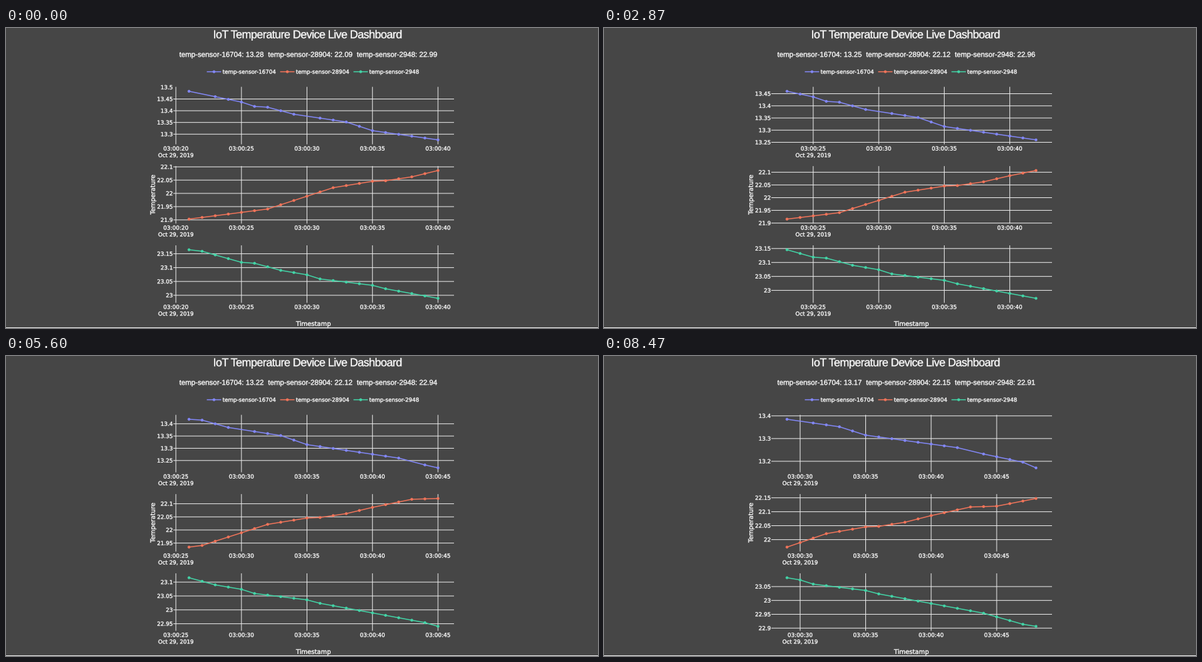
Write a matplotlib script that moves like this. It is 888x450 px and loops after 8.54 s.

```python
import math

import matplotlib.pyplot as plt
import numpy as np
from matplotlib.animation import ArtistAnimation
from matplotlib.collections import LineCollection
from matplotlib.patches import PathPatch, Rectangle
from matplotlib.path import Path
from matplotlib.textpath import TextPath

W, H, DPI = 888, 450, 100
PX = 72 / DPI
STEP, FRAMES = 70, 122
UPDATE_MS, HEAD_START = 1038, 198  # charts refresh on a steady timer
UPDATES = 9
BG = "#464646"
SANS, ARIAL = "DejaVu Sans", "Liberation Sans"

# Each sensor drifts in straight stretches between a few key readings.
SENSORS = [
    ("temp-sensor-16704", "#8287f5",
     {21: 13.483, 25: 13.437, 26: 13.4185, 27: 13.415, 29: 13.385, 33: 13.352,
      35: 13.315, 42: 13.26, 44: 13.232, 47: 13.196, 48: 13.171}),
    ("temp-sensor-28904", "#f0745a",
     {21: 21.903, 27: 21.941, 32: 22.0214, 35: 22.0455, 36: 22.0475,
      38: 22.0623, 40: 22.0862, 43: 22.117, 45: 22.12, 48: 22.1475}),
    ("temp-sensor-2948", "#43d3a6",
     {21: 23.1645, 22: 23.159, 25: 23.119, 26: 23.1157, 28: 23.09, 30: 23.074,
      31: 23.059, 35: 23.036, 36: 23.0236, 40: 22.989, 44: 22.954, 47: 22.914,
      48: 22.9065}),
]
MISSING = {22, 30, 43}  # seconds the first chart never received

LEFT, RIGHT = 251, 672
TOP, PITCH, PANEL_H = 88.3, 118.85, 86.2
CLIP_X = 678.4

fig = plt.figure(figsize=(W / DPI, H / DPI), dpi=DPI, facecolor=BG)
ax = fig.add_axes([0, 0, 1, 1])
ax.set_xlim(0, W)
ax.set_ylim(H, 0)
ax.axis("off")


def reading(k, second):
    keys = SENSORS[k][2]
    return float(np.interp(second, list(keys), list(keys.values())))


def advance(s, size, font):
    bar = TextPath((0, 0), "|", size=size, prop={"family": font})
    full = TextPath((0, 0), s + "|", size=size, prop={"family": font})
    return full.get_extents().x1 - bar.get_extents().x1


def glyphs(s, x, y, size, align=0.0, font=SANS, upright=False):
    """Outline of a text; align is 0 for left, 0.5 for centre, 1 for right."""
    path = TextPath((0, 0), s, size=size, prop={"family": font})
    v = path.vertices - [align * advance(s, size, font), 0]
    if upright:
        v = np.column_stack([-v[:, 1], v[:, 0]])
    return Path(v * [1, -1] + [x, y], path.codes)


def tracked(s, x, y, size, font, spacing):
    """Outlines of single letters, kerned and set with extra spacing."""
    paths = []
    for i, c in enumerate(s):
        if c != " ":
            dx = advance(s[:i + 1], size, font) - advance(c, size, font)
            paths.append(glyphs(c, x + dx + i * spacing, y, size, font=font))
    return paths


def add_paths(paths, color, edge, zorder=1):
    patch = PathPatch(Path.make_compound_path(*paths), fc=color, ec=color,
                      lw=edge * PX, zorder=zorder)
    ax.add_patch(patch)
    patch.set_clip_path(Rectangle((0, 0), CLIP_X, H, transform=ax.transData))
    return patch


def add_text(paths, edge=0.35):
    return add_paths(paths, "#fbfbfb", edge)


def dotted_line(xs, ys, dots, color):
    line, = ax.plot(xs, ys, color=color, lw=1.5 * PX, zorder=3, snap=False)
    return [line, add_paths([Path.circle(p, 2.1) for p in dots], color, 0, 4)]


def panel(k, first, last, right):
    """Grid segments, text outlines and line artists of one chart."""
    secs = [s for s in range(first, last + 1) if k or s not in MISSING]
    vals = [reading(k, s) for s in secs]
    top = TOP + k * PITCH
    bottom = top + PANEL_H
    x0, x1 = 274.5, right - 24
    y0, y1 = top + 79.5, top + 6.6
    lo, hi = min(vals), max(vals)

    def to_x(s):
        return x0 + (s - secs[0]) / (secs[-1] - secs[0]) * (x1 - x0)

    def to_y(v):
        return y0 + (v - lo) / (hi - lo) * (y1 - y0)

    grid, texts = [], []
    span = (hi - lo) * PANEL_H / (y0 - y1)
    dtick = 0.05 if span < 0.2475 else 0.1
    for n in range(math.floor(lo / dtick) - 1, math.ceil(hi / dtick) + 2):
        v = round(n * dtick, 2)
        y = to_y(v)
        if top <= y <= bottom:
            texts.append(glyphs(f"{v:g}", 250.3, y + 3, 8.3, 1))
            if top + 0.7 < y < bottom - 0.7:
                grid.append([(LEFT, y), (right, y)])

    ticks = [s for s in range(20, 55, 5) if LEFT <= to_x(s) <= right]
    for s in ticks:
        grid.append([(to_x(s), top), (to_x(s), bottom)])
        texts.append(glyphs(f"03:00:{s}", to_x(s), bottom + 9.2, 8.4, 0.5))
    texts.append(glyphs("Oct 29, 2019", to_x(ticks[0]), bottom + 19.2, 8.2,
                        0.5))

    points = [(to_x(s), to_y(v)) for s, v in zip(secs, vals)]
    return grid, texts, dotted_line(*zip(*points), points, SENSORS[k][1])


def charts(n):
    first, last = 21 + n, 40 + n
    ahead = n in (3, 4)  # the first sensor runs a second ahead for a while
    # A tick label past the right edge narrows the plot.
    right = RIGHT - 14 if n == 3 else RIGHT
    shift = (right - RIGHT) / 2
    grid, artists = [], []
    texts = [glyphs("Temperature", 223.4, 250, 9.45, 0.5, upright=True),
             glyphs("Timestamp", 461.2 + shift, 446.8, 9.4, 0.5)]
    for k, (name, color, _) in enumerate(SENSORS):
        g, t, line = panel(k, first, last + (ahead and k == 0), right)
        grid += g
        texts += t
        x, y = 302 + 110 * k + shift, 65.6
        texts.append(glyphs(name, x + 22.8, 68.5, 8.2))
        artists += line + dotted_line([x, x + 20], [y, y], [(x + 10, y)], color)
    lines = LineCollection(grid, colors="#ececec", linewidths=PX, zorder=2)
    lines.set_snap(False)
    ax.add_collection(lines)
    return artists + [lines, add_text(texts)]


def header(n):
    second = 40 + n + (n == 4)
    return add_text([glyphs(f"{name}: {reading(k, second):.2f}",
                            260 + 133.1 * k, 43.3, 10.8, font=ARIAL)
                     for k, (name, _, _) in enumerate(SENSORS)])


def latest(ms, lead):
    """Number of updates seen by now; lead(n) is how early the nth one comes."""
    return max(n for n in range(UPDATES)
               if n == 0 or n * UPDATE_MS - HEAD_START - lead(n) <= ms)


def header_lead(n):
    return max(0, 4 - n) * STEP


ax.add_patch(Rectangle((0, H - 1), W, 1, fc="#ececec", lw=0))
add_text(tracked("IoT Temperature Device Live Dashboard", 310.6, 15.3, 17,
                 ARIAL, -0.58))

chart_sets = [charts(n) for n in range(UPDATES)]
headers = [header(n) for n in range(UPDATES)]
frames = [chart_sets[latest(i * STEP, lambda n: 0)]
          + [headers[latest(i * STEP, header_lead)]]
          for i in range(FRAMES)]

anim = ArtistAnimation(fig, frames, interval=STEP, repeat=True, repeat_delay=0,
                       blit=False)
plt.show()
```
